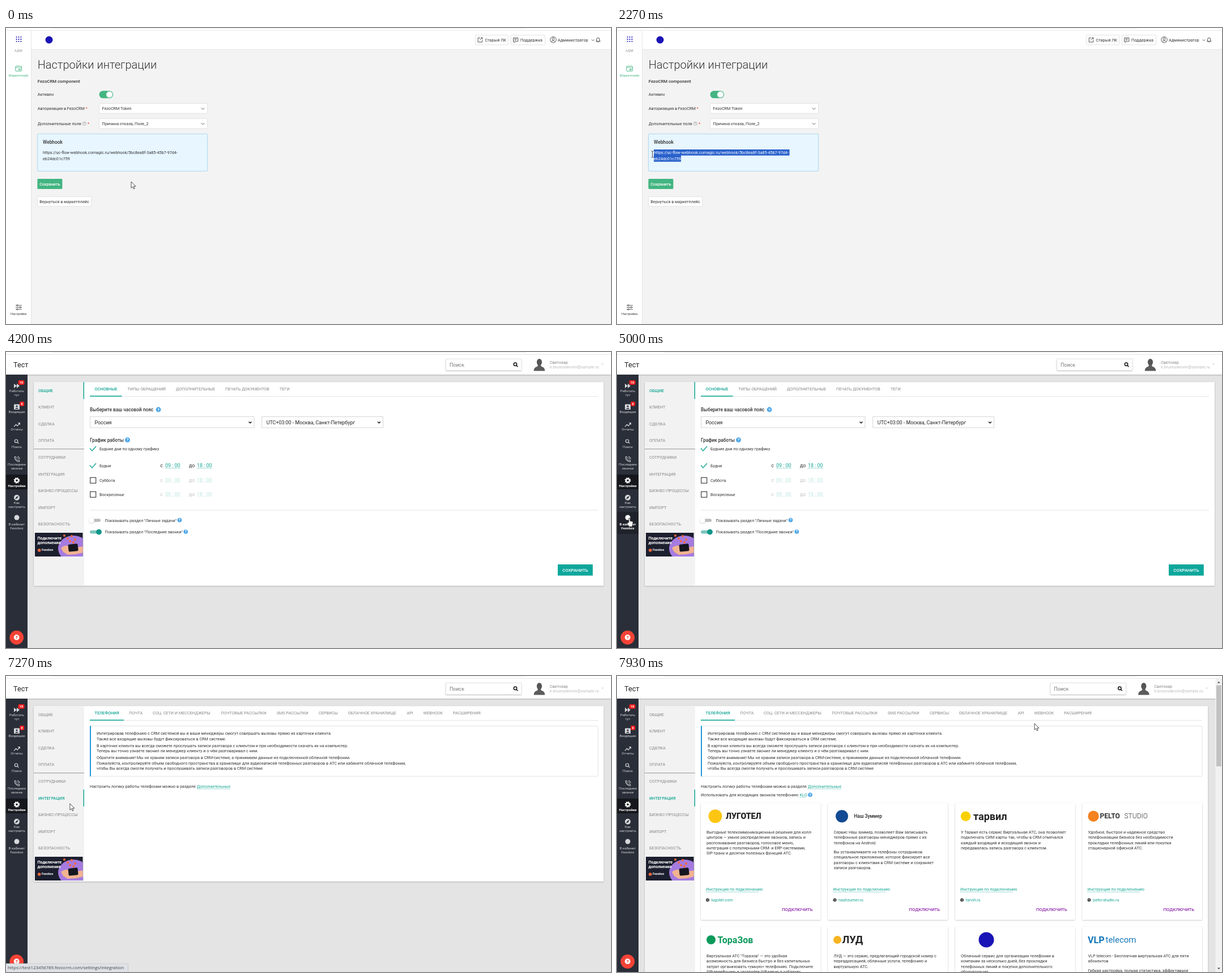
Write an HTML page that moves like this. It is 1068 by 524 pixels and loops after 8 s.

```html
<!DOCTYPE html>
<html lang="ru">
<head>
<meta charset="utf-8">
<title>Настройки интеграции</title>
<style>
html, body { margin: 0; width: 100%; height: 100%; overflow: hidden; background: #fff; }
svg { display: block; width: 100%; height: 100%; font-family: Roboto, sans-serif; }
text { white-space: pre; }
</style>
</head>
<body>
<svg id="stage" viewBox="0 0 1068 524">
  <defs>
    <clipPath id="selected"><rect id="sel1" y="215" height="10.7"/><rect id="sel2" y="225.7" height="11"/></clipPath>
    <clipPath id="bannerClip"><rect x="51" y="320" width="84.5" height="42"/></clipPath>
    <filter id="shadow" x="-10%" y="-10%" width="120%" height="120%"><feDropShadow dx="0" dy=".8" stdDeviation="1" flood-opacity=".28"/></filter>
  </defs>
  <g id="page"></g>
  <g id="selection" clip-path="url(#selected)"></g>
  <g id="status"></g>
  <g id="cursor" stroke="#222" stroke-width=".8" stroke-linejoin="round" fill="#fff">
    <path id="arrow" d="M0 0v11.3l2.6-2.4 1.8 4 1.8-.8-1.8-3.9h3.6z"/>
    <path id="hand" d="M-1.2 7.5V1a1.1 1.1 0 0 1 2.3 0v4.2l4.2.9q1 .3.9 1.5l-.8 4.4-.7 3.2h-5.3l-3.3-4.8q-.8-1.4.5-1.7z"/>
    <path id="beam" fill="none" d="M-2-5.5h1.5l.5.5.5-.5H2M0-5V5M-2 5.5h1.5L0 5l.5.5H2"/>
  </g>
</svg>
<script>
const $ = id => document.getElementById(id);
const LOOP = 8000, STEP = 1000 / 15;
const TEAL = '#12a594', GREEN = '#43b581', BLUE = '#1a13b5', GREY = '#858585';

// Text is placed by the middle of its capitals.
const T = (x, y, str, { s = 7.23, f = '#333', w = 400, a = 'start', more = '' } = {}) =>
  `<text x="${x}" y="${y + s * .355}" font-size="${s}" fill="${f}" font-weight="${w}" text-anchor="${a}" ${more}>${str}</text>`;
const R = (x, y, w, h, f, more = '') => `<rect x="${x}" y="${y}" width="${w}" height="${h}" fill="${f}" ${more}/>`;
const C = (x, y, r, f, more = '') => `<circle cx="${x}" cy="${y}" r="${r}" fill="${f}" ${more}/>`;
const P = (d, stroke, w = 1, more = 'fill="none"') => `<path d="${d}" stroke="${stroke}" stroke-width="${w}" ${more}/>`;
const fillPath = (d, f) => `<path d="${d}" fill="${f}"/>`;
const frame = (x, y, w, h, stroke = '#dcdcdc', f = '#fff') => R(x, y, w, h, f, `stroke="${stroke}" stroke-width=".8" rx="1.5"`);
const chevron = (x, y, f = '#444', r = 2.8, w = .9) => P(`M${x - r} ${y - r / 2}l${r} ${r} ${r} ${-r}`, f, w);
const help = (x, y, r = 4.4) => C(x, y, r, '#4aa5ea') + T(x, y, '?', { s: r * 1.7, f: '#fff', w: 700, a: 'middle' });
const link = (x, x2, y, str, s) => T(x, y, str, { f: TEAL, s }) + P(`M${x} ${y + 4.5}H${x2}`, TEAL, .7, 'stroke-dasharray="1.3 .9"');
const lens = (x, y, f, w = 1.4) => C(x, y, 2.7, 'none', `stroke="${f}" stroke-width="${w}"`) + P(`M${x + 2} ${y + 2}l2.5 2.5`, f, w);

const browserEdge = R(0, 0, 1068, 5, '#fff') + R(80, -6, 840, 6.8, '#e4e6e8', 'rx="3"') + R(0, 3.8, 1068, .9, '#dfe1e4');
const URL1 = 'https://uc-flow-webhook.comagic.ru/webhook/5bc8ea8f-3a85-45b7-97d4-';
const URL2 = 'eb24dc01c759';
const hookUrl = f => T(65, 220, URL1, { f }) + T(65, 231, URL2, { f });

function componentPage() {
  let dots = '';
  for (let i = 0; i < 9; i++) dots += C(18.6 + i % 3 * 3.9, 16 + (i / 3 | 0) * 3.9, 1.05, BLUE);
  const sliders = [491, 494.5, 498].map((y, i) =>
    P(`M17 ${y}h11`, '#333', .8) + C([20, 25, 20][i], y, 1.2, '#fff', 'stroke="#333" stroke-width=".8"')).join('');
  const field = (y, str) => frame(164.6, y, 191, 17.6) + T(169.5, y + 8.7, str) + chevron(347.5, y + 9.2);
  return R(0, 0, 1068, 524, '#f3f3f3') + R(0, 0, 1068, 38, '#fff') + R(44, 37.6, 1024, .8, '#e2e2e2')
    + R(0, 0, 44.4, 524, '#fff') + R(44.2, 5, .8, 519, '#e0e0e0') + browserEdge + dots
    + T(22, 40, 'АДМ', { s: 5.6, f: GREY, a: 'middle', more: 'letter-spacing=".4"' })
    + R(16.8, 67.5, 10.8, 8.8, 'none', `stroke="${GREEN}" stroke-width=".9" rx="1"`) + P('M17 70h10.5M22.5 72.8h3v1.5h-3z', GREEN, .9)
    + T(22.3, 84, 'Маркетплейс', { s: 5.56, f: GREEN, a: 'middle' })
    + sliders + T(22.2, 506.3, 'Настройки', { s: 5.56, a: 'middle' })
    + C(76, 21, 6.5, BLUE)
    + frame(828.5, 12.5, 58, 17.3) + P('M837 17.5h-3.8v7.5h7.5v-3.8M838 17h3v3M841 17l-4.7 4.7', '#444', .9) + T(845.5, 21.2, 'Старый ЛК')
    + frame(891.5, 12.5, 60, 17.3) + P('M895.6 17.4h8.2v6.4h-4.8l-2 2v-2h-1.4zM897.5 19.6h4.4M897.5 21.6h3', '#444', .9) + T(908, 21.2, 'Поддержка')
    + C(966, 20.8, 5.3, 'none', 'stroke="#333" stroke-width=".8"') + C(966, 19.2, 2, 'none', 'stroke="#333" stroke-width=".8"')
    + P('M962.3 24.4q3.7-4 7.4 0', '#333', .8) + T(974, 21.2, 'Администратор') + chevron(1036, 21.5, '#444', 2.2)
    + P('M1041.5 23.5h7.4l-1.2-1.6v-2a2.5 2.5 0 0 0-5 0v2zM1044.2 24.9h2', '#333', .9)
    + T(55.7, 64.4, 'Настройки интеграции', { s: 20.03, w: 300 })
    + T(55.7, 94.5, 'FezoCRM component', { s: 7.79, w: 500 })
    + T(55.7, 117.8, 'Активен') + R(164.5, 111.3, 24.6, 13, GREEN, 'rx="6.5"') + C(182.5, 117.8, 5.5, '#fff')
    + T(55.7, 142.3, 'Авторизация в FezoCRM') + T(140.5, 142.3, '*', { f: '#e53935' }) + field(133.6, 'FezoCRM Token')
    + T(55.7, 169, 'Дополнительные поля') + C(138.4, 169.3, 3.1, 'none', 'stroke="#888" stroke-width=".6"')
    + T(138.4, 169.3, '?', { s: 4.8, f: '#777', a: 'middle' }) + T(144, 169, '*', { f: '#e53935' }) + field(160.4, 'Причина отказа, Поле_2')
    + frame(55.6, 187.4, 300, 66, '#9bd0ea', '#e7f6ff') + T(65, 202, 'Webhook', { s: 8.34, w: 500 }) + hookUrl('#333')
    + R(55.4, 267, 44, 18, GREEN, 'rx="1.5"') + T(77.4, 276.2, 'Сохранить', { f: '#fff', a: 'middle', w: 500 })
    + frame(55.6, 298.6, 95, 17.2) + T(103, 307.4, 'Вернуться в маркетплейс', { a: 'middle' });
}

// Side bar rows: label lines, top, bottom, label middle, icon.
const ICON = '#d5d7db', BAR = '#2a2e38';
const side = [
  [['Работать', 'тут'], 43, 84, 69, f => fillPath('M14 56l5 4-5 4zM19 56l5 4-5 4z', f)],
  [['Входящие'], 84, 116, 106.3, f => R(14, 92.5, 10, 9.5, f, 'rx="1"') + C(19, 96, 1.6, BAR) + fillPath('M15.8 100.7q3.2-4 6.4 0z', BAR)],
  [['Отчеты'], 116, 146, 137.3, f => P('M14 132.3l3.6-4 2.6 2.6 3.8-5M21.3 125.7h3v3', f, 1.2)],
  [['Поиск'], 146, 176, 168.3, f => lens(18, 157.7, f, 1.2)],
  [['Последние', 'звонки'], 176, 215, 198.7, f => P('M15 185.5q0 8 8.5 9l.4-2.5-2.6-.8-1.4 1.2-2.7-3 1-1.3-.9-2.8zM20 185q4 .4 4.3 4.5M20 187.5q1.8.2 2 2', f, 1)],
  [['Настройки'], 217, 243, 237, f => C(19, 227.4, 3, 'none', `stroke="${f}" stroke-width="2.4"`) + C(19, 227.4, 4.6, 'none', `stroke="${f}" stroke-width="1.5" stroke-dasharray="2 1.61"`)],
  [['Как', 'настроить'], 245, 283, 267, f => C(19, 257.8, 5, f) + fillPath('M22 254.8l-2 4-4 2 2-4z', BAR)],
  [['В кабинет', 'Fezobox'], 283, 322, 304.7, f => C(19, 293, 4.5, f)],
];
const menu = ['ОБЩИЕ', 'КЛИЕНТ', 'СДЕЛКА', 'ОПЛАТА', 'СОТРУДНИКИ', 'ИНТЕГРАЦИЯ', 'БИЗНЕС-ПРОЦЕССЫ', 'ИМПОРТ', 'БЕЗОПАСНОСТЬ'];
const menuY = i => 68.2 + i * 29.55;

function sideBar(hover) {
  const badge = (x, y, w, n) => R(x - w / 2, y - 4, w, 8, '#f01e1e', 'rx="2"') + T(x, y, n, { s: 5.6, f: '#fff', w: 700, a: 'middle' });
  return R(0, 40, 38, 484, BAR) + side.map(([lines, top, bottom, y, icon], i) => {
    const active = i === 5, lit = active || i === hover, f = lit ? '#fff' : ICON;
    return (lit ? R(0, top, 38, bottom - top, active ? '#15171c' : '#1f222a') : '') + icon(f)
      + lines.map((str, k) => T(19, y + k * 7.2, str, { s: 6.12, f, w: lit ? 700 : 400, a: 'middle' })).join('');
  }).join('') + badge(27, 54, 11, '18') + badge(28.2, 91.7, 8, '8')
    + C(18.7, 505.5, 12.4, '#f44336') + C(18.7, 505.2, 4.9, '#fff') + T(18.7, 505.2, '?', { s: 8, f: '#f44336', w: 900, a: 'middle' });
}

const banner = `<g clip-path="url(#bannerClip)">` + R(51, 320, 85, 42, '#1c1f2e')
  + `<ellipse cx="119" cy="348" rx="27" ry="23" fill="#a57be0"/>`
  + fillPath('M97 347q6-5 13-4l14 3 12-2v11l-12 3-15 1-8-5z', '#f2b391') + R(110, 340, 17, 13, '#15161f', 'rx="2" transform="rotate(-6 118 346)"')
  + [[103, 325], [109, 330], [116, 326], [113, 335], [122, 332], [119, 337]].map(([x, y]) => C(x, y, 2, '#f4683c')).join('')
  + T(55.5, 329, 'Подключите', { s: 7.2, f: '#fff', w: 700 }) + T(55.5, 337.2, 'дополнения', { s: 7.2, f: '#fff', w: 700 })
  + C(58.7, 351, 2.8, '#f4683c') + T(63, 350.5, 'Fezobox', { s: 5.4, f: '#fff', w: 700 }) + '</g>';

function tabs(list, activeEnd, right) {
  return list.map(([x, str], i) => T(x, 65.6, str, { f: i ? GREY : TEAL, w: i ? 400 : 500 })).join('')
    + R(148, 78.2, right - 158, .8, '#dcdcdc') + R(148, 77.4, activeEnd - 148, 1.6, TEAL);
}

function generalPanel() {
  const select = (x, w, str) => R(x, 114.5, w, 19.5, '#fff', 'stroke="#ccc" stroke-width=".8"') + T(x + 8, 124.4, str, { s: 8.9, f: '#222' }) + chevron(x + w - 7, 124.6, '#111', 2.4, 1.4);
  const tick = y => P(`M148 ${y}l4 4.5 7-8`, TEAL, 1.4);
  const hours = (y, dim) => `<g opacity="${dim ? .28 : 1}">` + T(272.3, y, 'с', { s: 8.9 }) + link(281, 308, y, '09 : 00', 8.9)
    + T(323, y, 'до', { s: 8.9 }) + link(337, 364, y, '18 : 00', 8.9) + '</g>';
  const dayOff = (y, str) => R(148.7, y - 4.8, 10, 10, '#fff', 'stroke="#333" stroke-width="1.1"') + T(165, y, str) + hours(y - .5, true);
  return tabs([[156.5, 'ОСНОВНЫЕ'], [214.5, 'ТИПЫ ОБРАЩЕНИЙ'], [300, 'ДОПОЛНИТЕЛЬНЫЕ'], [387, 'ПЕЧАТЬ ДОКУМЕНТОВ'], [483, 'ТЕГИ']], 204.5, 1055)
    + T(148, 102.3, 'Выберите ваш часовой пояс', { s: 8.34, w: 500 }) + help(269, 102)
    + select(148.5, 289.5, 'Россия') + select(451.7, 213.8, 'UTC+03:00 - Москва, Санкт-Петербург')
    + T(148, 156.3, 'График работы', { s: 8.34, w: 500 }) + help(214.5, 155.6)
    + tick(170.5) + T(165, 171.7, 'Будние дни по одному графику')
    + tick(200.5) + T(165, 201.9, 'Будни') + hours(201.2)
    + dayOff(227, 'Суббота') + dayOff(252, 'Воскресенье')
    + R(148, 279.6, 897, .8, '#dcdcdc')
    + R(150, 295.2, 17, 5.6, '#bdbdbd', 'rx="2.8"') + C(151, 298, 4.8, '#fff', 'filter="url(#shadow)"') + T(174.5, 298, 'Показывать раздел "Личные задачи"') + help(306.4, 297.6, 3.8)
    + R(148, 315.8, 17, 5.6, '#7cc4bc', 'rx="2.8"') + C(164, 318.6, 4.9, '#0f9688') + T(174.5, 318.5, 'Показывать раздел "Последние звонки"') + help(317.3, 318, 3.8)
    + R(974, 376, 61.8, 19.8, '#0ea79c') + T(1005, 386, 'СОХРАНИТЬ', { s: 7.79, f: '#fff', w: 500, a: 'middle' });
}

const notes = [
  [101.6, 'Интегрировав телефонию с CRM системой вы и ваши менеджеры смогут совершать вызовы прямо из карточки клиента.'],
  [111.2, 'Также все входящие вызовы будут фиксироваться в CRM системе.'],
  [123.4, 'В карточке клиента вы всегда сможете прослушать записи разговора с клиентом и при необходимости скачать их на компьютер.'],
  [132.8, 'Теперь вы точно узнаете звонил ли менеджер клиенту и о чём разговаривал с ним.'],
  [144.7, 'Обратите внимание! Мы не храним записи разговора в CRM-системе, а принимаем данные из подключенной облачной телефонии.'],
  [154, 'Пожалуйста, контролируйте объем свободного пространства в хранилище для аудиозаписей телефонных разговоров в АТС или кабинете облачной телефонии,'],
  [163.3, 'чтобы Вы всегда смогли получать и прослушивать записи разговоров в CRM системе'],
];

function phonePanel(right) {
  return tabs([[156.5, 'ТЕЛЕФОНИЯ'], [217.5, 'ПОЧТА'], [259, 'СОЦ. СЕТИ И МЕССЕНДЖЕРЫ'], [379.5, 'ПОЧТОВЫЕ РАССЫЛКИ'], [477.7, 'SMS РАССЫЛКИ'],
    [552, 'СЕРВИСЫ'], [603.6, 'ОБЛАЧНОЕ ХРАНИЛИЩЕ'], [707.5, 'API'], [736.5, 'WEBHOOK'], [789, 'РАСШИРЕНИЯ']], 208, right)
    + frame(148.5, 88.5, right - 158.5, 89) + R(148, 88.3, 2, 89.4, '#2196db')
    + notes.map(([y, str]) => T(160, y, str)).join('')
    + T(148, 195.3, 'Настроить логику работы телефонии можно в разделе') + link(337, 396, 195.3, 'Дополнительные');
}

// Card: logo circle (x offset, radius, colour), wordmark pieces, text paragraphs, site.
const cards = [
  { dot: [25.5, 12, '#fcc613'], mark: [[44, 'ЛУГОТЕЛ', 14.2, 800, '#222']], site: 'lugotel.com',
    text: 'Выгодные телекоммуникационные решения для колл-|центров — умное распределение звонков, запись и|распознавание разговоров, голосовое меню,|интеграция с популярными CRM- и ERP-системами,|SIP-транк и десятки полезных функций АТС.' },
  { dot: [24.5, 11, '#124a94'], mark: [[46, 'Наш Зуммер', 8.2, 500, '#222']], site: 'nashzumer.ru',
    text: 'Сервис Наш зуммер, позволяет Вам записывать|телефонные разговоры менеджеров прямо с их|телефонов на Android.||Вы устанавливаете на телефоны сотрудников|специальное приложение, которое фиксирует все|разговоры с клиентами в CRM системе и сохраняет|записи разговоров.' },
  { dot: [18.5, 8.7, '#fbd000'], mark: [[32, 'тарвил', 18, 700, '#222']], site: 'tarvill.ru',
    text: 'У Тарвил есть сервис Виртуальная АТС, она позволяет|подключать СИМ карты так, чтобы в CRM отмечался|каждый входящий и исходящий звонок и|передавалась запись разговора с клиентом.' },
  { dot: [19.5, 9.7, '#f58220'], mark: [[31, 'PELTO', 12, 700, '#333'], [74, 'STUDIO', 12, 300, '#333']], site: 'pelto-studio.ru',
    text: 'Удобное, быстрое и надежное средство|телефонизации бизнеса без необходимости|прокладки телефонных линий или покупки|стационарной офисной АТС.' },
  { dot: [18, 8, '#0c9a5b'], mark: [[29.5, 'ТораЗов', 16, 700, '#0c9a5b']],
    text: 'Виртуальная АТС "Торазов" — это удобная|возможность для бизнеса быстро и без капитальных|затрат организовать «умную» телефонию. Подключите|SIP-телефонию и настройте IVR-меню в «облаке»' },
  { dot: [16.5, 7, '#f6b421'], mark: [[25, 'ЛУД', 18, 700, '#222']],
    text: 'ЛУД — это сервис, предлагающий городской номер с|переадресацией, облачные услуги, телефонию и|виртуальную АТС.' },
  { dot: [55, 13.5, BLUE], mark: [],
    text: 'Облачный сервис для организации телефонии в|компании за несколько дней, без прокладки|телефонных линий и покупки дополнительного|оборудования.' },
  { mark: [[9.5, 'VLP', 16, 700, '#1377b8'], [41, 'telecom', 15, 400, '#1377b8']],
    text: 'VLP telecom - Бесплатная виртуальная АТС для пяти|абонентов||Гибкая настройка, полная статистика, эффективное' },
];

function card({ dot, mark, text, site }, i) {
  const x = 148 + i % 4 * 224.5, y = i < 4 ? 225.5 : 444.3, logoY = y + 22.7;
  let lineY = y + 51;
  const body = text.split('|').map(str => {
    const out = T(x + 10, lineY, str);
    lineY += str ? 9.35 : 7;
    return out;
  }).join('');
  return R(x, y, 211.5, 206, '#fff', 'filter="url(#shadow)"') + (dot ? C(x + dot[0], logoY, dot[1], dot[2]) : '')
    + mark.map(([dx, str, s, w, f]) => T(x + dx, logoY, str, { s, w, f })).join('') + body
    + (site ? link(x + 9, x + 102, 377.8, 'Инструкция по подключению') + C(x + 12, 396.5, 3, '#333') + P(`M${x + 10} 395.5l2 1.2 1.5-2.2M${x + 12} 398.5l1.8-1`, '#fff', .7)
      + T(x + 18.6, 396.6, site, { f: TEAL }) + T(x + 143, 413, 'ПОДКЛЮЧИТЬ', { s: 7.79, f: '#8e24aa', w: 500 }) : '');
}

function crmPage({ tab, loaded, hoverSide, hoverMenu }) {
  const right = loaded ? 1043 : 1055, shift = loaded ? -11.7 : 0;
  const bottom = tab === 0 ? 413.7 : loaded ? 540 : 363.7;
  const header = R(0, 0, 1068, 40, '#fff', 'filter="url(#shadow)"') + browserEdge + T(13, 22.3, 'Тест', { s: 12.7, f: '#222' })
    + `<g transform="translate(${shift})">` + R(776.8, 12.6, 133, 20, '#fff', 'stroke="#ddd" stroke-width=".6" filter="url(#shadow)"')
    + T(783, 22.7, 'Поиск', { s: 8.9, f: '#777' }) + lens(899, 21.8, '#111', 1.5)
    + `<ellipse cx="941.5" cy="18" rx="4.6" ry="6" fill="#555"/>` + fillPath('M931.8 33.5q0-6.5 6-7.7l1.5-3h4.4l1.5 3q6 1.2 6 7.7z', '#5c5c5c')
    + T(960, 18, 'Светозар', { f: GREY }) + T(960, 26.2, 'k.brusnyakovin@sample.ru', { f: '#bdbdbd' }) + chevron(1053, 21.3, '#bbb', 1.8) + '</g>';
  const nav = R(49, 53.3, 89, bottom - 53.3, '#f2f2f2') + (hoverMenu >= 0 ? R(49, menuY(hoverMenu) - 15, 88.5, 30, '#e7e7e7') : '')
    + menu.map((str, i) => T(57, menuY(i), str, { f: i === tab ? TEAL : GREY, w: i === tab ? 500 : 400 })).join('')
    + R(49, 171.3, 89, .9, '#8a8a8a') + R(136.5, menuY(tab) - 15, 1.5, 30, TEAL) + banner;
  const scroll = R(1056.5, 5, 11.5, 519, '#f1f1f1') + R(1058, 16.5, 8.7, 143.5, '#c1c1c1')
    + fillPath('M1059.8 12.5l2.5-3 2.5 3z', '#555') + fillPath('M1059.8 516.5l2.5 3 2.5-3z', '#555');
  return R(0, 0, 1068, 524, '#e4e4e4') + R(49, 53.3, right - 49, bottom - 53.3, '#fff', 'filter="url(#shadow)"') + nav
    + (tab === 0 ? generalPanel() : phonePanel(right))
    + (loaded ? T(148, 210.3, 'Использовать для исходящих звонков телефонию') + link(322.5, 333.5, 210.3, 'KLO') + help(341, 210.3, 3.8) + cards.map(card).join('') : '')
    + header + sideBar(hoverSide) + (loaded ? scroll : '');
}

// Pointer path: time, x, y.
const path = [
  [0, 221, 272], [70, 221, 273], [130, 221, 274], [270, 220, 273], [470, 145, 248], [670, 57, 222], [870, 80, 255], [1070, 150, 269],
  [1200, 147, 231], [1330, 118, 232], [1870, 62.5, 223.5], [2270, 62.5, 223.5], [2400, 69, 225], [2800, 69, 225], [3070, 180, 160], [3400, 486, 13],
  [4400, 572, 18], [4600, 420, 90], [4800, 130, 230], [5000, 22, 294], [5130, 22, 290], [5270, 20, 259], [5470, 18, 231], [5870, 18, 231], [6130, 60, 222], [6400, 101, 214],
  [6930, 101, 214], [7270, 113, 226], [7400, 150, 212], [7600, 420, 135], [7800, 690, 90], [7930, 737, 84],
];
function pointer(t) {
  const i = path.findIndex(p => p[0] > t);
  if (i < 0) return path.at(-1).slice(1);
  const [t0, x0, y0] = path[i - 1], [t1, x1, y1] = path[i], k = (t - t0) / (t1 - t0);
  return [x0 + (x1 - x0) * k, y0 + (y1 - y0) * k];
}

function setSelection(t, x, y) {
  const on = t >= 1390 && t < 4190;
  $('selection').style.display = on ? '' : 'none';
  if (!on) return;
  const from = t >= 1860 ? 65 : Math.max(65, x), upper = y < 226 || t >= 1860;
  const span = (id, a, b) => { $(id).setAttribute('x', a); $(id).setAttribute('width', Math.max(0, b - a)); };
  span('sel1', upper ? from : 304.5, 304.5);
  span('sel2', upper ? 65 : from, 113);
}

function setStatus(t) {
  const alpha = t < 5660 || t > 7860 ? 0 : t < 5725 || t > 7795 ? .5 : 1;
  const long = t >= 6260, w = long ? 216 : 172;
  $('status').innerHTML = alpha ? `<g opacity="${alpha}">` + fillPath(`M0 524V508.8H${w - 2}q2 0 2 2V524z`, '#c6c9ce') + fillPath(`M0 524V509.5H${w - 3}q2 0 2 2V524z`, '#dee1e6')
    + T(3, 516.7, 'https://test123456789.fezocrm.com/settings' + (long ? '/integration' : ''), { s: 7.87, f: '#444', more: 'style="font-family:\'Open Sans\',sans-serif"' }) + '</g>' : '';
}

$('selection').innerHTML = R(60, 210, 250, 30, '#2a62cc') + hookUrl('#fff');
let shown = '', lastStep = -1;
function render(now) {
  requestAnimationFrame(render);
  const step = Math.floor((now % LOOP + 5) / STEP);
  if (step === lastStep) return;
  lastStep = step;
  const t = step * STEP % LOOP, [x, y] = pointer(t), crm = t >= 4190;
  const visible = t < 3460 || t >= 4460, pointing = crm && visible && t < 6925;
  const state = crm ? {
    tab: t < 6925 ? 0 : 5,
    loaded: t >= 7525,
    hoverSide: pointing && x < 38 ? side.findIndex(s => y >= s[1] && y < s[2]) : -1,
    hoverMenu: pointing && x > 49 && x < 138 ? menu.findIndex((_, i) => Math.abs(y - menuY(i)) < 14.8) : -1,
  } : null;
  const key = JSON.stringify(state);
  if (key !== shown) $('page').innerHTML = crm ? crmPage(state) : componentPage();
  shown = key;
  setSelection(t, x, y);
  setStatus(t);
  const shape = !crm ? (t >= 1320 && t < 2330 ? 'beam' : 'arrow') : state.hoverSide >= 0 || state.hoverMenu >= 0 ? 'hand' : 'arrow';
  for (const id of ['arrow', 'hand', 'beam']) $(id).style.display = visible && id === shape ? '' : 'none';
  $('cursor').setAttribute('transform', `translate(${x} ${y})`);
}
render(performance.now());
</script>
</body>
</html>
```
